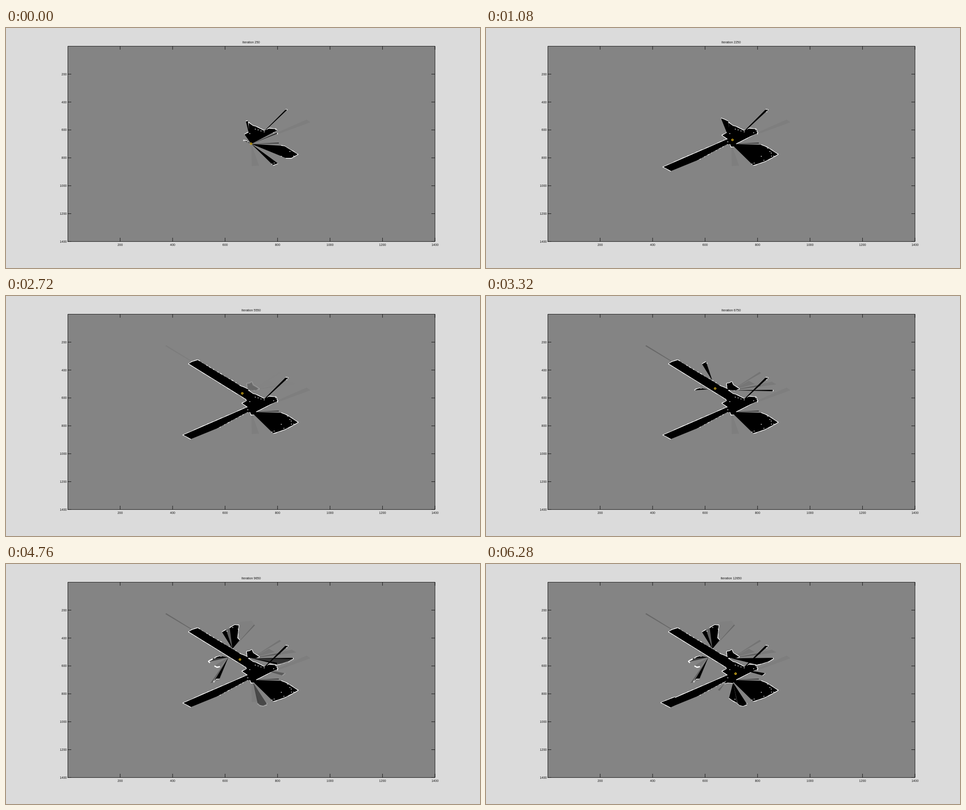
Recreate the animation shown at these times as an HTML page. Size 1053 px wide and 532 px high, loop 6.32 s.

```html
<!DOCTYPE html>
<html lang="en">
<head>
<meta charset="utf-8">
<title>Occupancy map</title>
<style>
  html, body { margin: 0; width: 100%; height: 100%; overflow: hidden; background: #dbdbdb; }
  svg { display: block; width: 100vw; height: 100vh; }
  text { font: 7px "Liberation Sans", Arial, sans-serif; fill: #111; }
  .middle { text-anchor: middle; }
  .end { text-anchor: end; }
  #walls { fill: none; stroke: #fff; stroke-width: 2.6; stroke-linejoin: round; }
  #walls .dotted { stroke-dasharray: 5 6 2 9 3 4; }
  #specks { fill: #fff; }
</style>
</head>
<body>
<svg viewBox="0 0 1053 532">
  <rect width="1053" height="532" fill="#dbdbdb"/>
  <rect x="137" y="40" width="816" height="433" fill="#848484"/>
  <g id="beams"></g>
  <g id="walls"></g>
  <g id="space"></g>
  <g id="specks"></g>
  <g id="axes"></g>
  <circle id="robot" r="1.9" fill="#2a2408" stroke="#f3c41c" stroke-width="1.4"/>
  <text id="title" class="middle" x="544.5" y="34"></text>
</svg>
<script>
const LOOP = 6320, STEP = 40, FADE = 350, FIRST = -FADE;
const $ = id => document.getElementById(id);
const clamp = v => Math.max(0, Math.min(1, v));
const mix = (a, b, k) => a.map((v, i) => v + (b[i] - v) * k);
const parse = s => s.trim().split(/\s+/).map(p => p.split(',').map(Number));

let seed = 7;
const random = () => (seed = seed * 16807 % 2147483647) / 2147483647;

function add(layer, tag, attrs, text = '') {
  const el = document.createElementNS('http://www.w3.org/2000/svg', tag);
  for (const k in attrs) el.setAttribute(k, attrs[k]);
  el.textContent = text;
  $(layer).append(el);
  return el;
}

// Every part of the map fades in once, from its start time.
const parts = [];
const reveal = (start, ...shape) => parts.push({ start, el: add(...shape) });

// Walks along a line in short steps: visit(a, b, k) for each.
function walk(points, size, visit) {
  for (let i = 1; i < points.length; i++) {
    const [a, b] = [points[i - 1], points[i]];
    const n = Math.ceil(Math.hypot(b[0] - a[0], b[1] - a[1]) / size);
    for (let k = 1; k <= n; k++) visit(mix(a, b, k / n));
  }
}

function wall(start, points, style = '') {
  const rough = [points[0]];
  walk(points, 4, p => rough.push(p.map(v => v + (random() - .5) * .9)));
  reveal(start, 'walls', 'polyline', { points: rough.join(' '), class: style });
}

// Open area; the outline after "|" is only partly seen.
function room(start, outline) {
  const [solid, rest] = outline.split('|').map(parse);
  const all = solid.concat(rest || []);
  reveal(start, 'space', 'polygon', { points: all.join(' ') });
  wall(start, rest ? solid : [...solid, solid[0]]);
  if (rest) wall(start, [solid.at(-1), ...rest], 'dotted');
}

// Grey, uncertain beam from an apex to a far edge.
const beam = (start, apex, far, fill) =>
  reveal(start, 'beams', 'polygon', { points: [apex, ...parse(far)].join(' '), fill });

// Cleared sector with a wall on its far edge and stray hits just inside it.
function fan(start, apex, far) {
  const edge = parse(far);
  reveal(start, 'space', 'polygon', { points: [apex, ...edge].join(' ') });
  wall(start, edge);
  walk(edge, 11, p => {
    const [x, y] = mix(p, apex, random() * .15);
    if (random() < .4) reveal(start, 'specks', 'rect', { x, y, width: 2.2, height: 1.4 });
  });
}

const home = [545, 257], nook = [545, 209], crown = [503, 188],
      west = [494, 207], south = [549, 263];

// First sweep
beam(FIRST, home, '546,306 562,305', '#7e7e7e');
beam(FIRST, home, '668,203 676,209', '#7e7e7e');
beam(FIRST, home, '606,254 606,256', '#333');
fan(FIRST, home, '530,236 540,231 539,210 549,217 554,218 574,228 584,223 599,224 602,227');
fan(FIRST, home, '533,207 537,206');
fan(FIRST, home, '621,181 625,181');
fan(FIRST, home, '603,232 602,234');
fan(FIRST, home, '527,249 535,251');
fan(FIRST, home, '611,261 619,262 632,270 648,280 634,288 621,288');
fan(FIRST, home, '604,300 593,304');

// Lower right area, then the crossing and the lower corridor
fan(160, home, '611,259 627,266 648,280 621,295 604,301 594,304');
fan(600, home, '522,200 530,203 538,207');
fan(600, home, '621,181 627,181');
room(700, '537,246 525,238 537,231 574,229 599,225 603,232 556,256 552,263 545,263');
room(700, '411,317 394,308 537,246 | 556,256 535,258 505,274 470,293');

// Upper corridor and its distant returns
room(1500, '537,231 406,150 413,146 426,142 | 460,163 503,188 549,218 574,229');
beam(2620, [500, 198], '354,111 356,109', '#686868');
beam(2700, nook, '608,168 611,171', '#747474');
beam(2700, nook, '584,188 597,195', '#767676');
beam(2700, nook, '635,190 645,196', '#7a7a7a');
beam(2700, nook, '610,197 610,200', '#5c5c5c');
room(2650, '536,204 535,194 541,193 546,190 549,197 563,206 | 553,209 538,208');
fan(2800, nook, '637,208 637,211');
fan(2850, crown, '480,151 489,146');
fan(2900, west, '463,209 469,206 476,204');

// Fans on both sides of the upper corridor
beam(3340, crown, '520,128 546,126 552,135', '#808080');
beam(3340, crown, '551,134 553,136', '#696969');
beam(3340, crown, '480,151 496,143 517,136', '#5c5c5c');
fan(3340, crown, '497,142 508,135 517,136 514,164 519,169');
beam(3360, west, '450,217 459,210 466,208', '#3c3c3c');
wall(3360, parse('453,219 450,216 459,210'));
beam(3400, west, '462,226 476,228', '#757575');
wall(3400, parse('463,226 469,229 475,227'));
beam(3420, west, '454,264 461,262 476,253', '#626262');
fan(3600, nook, '603,219 602,222');
fan(4000, west, '461,262 467,255 474,254');

// Way back
fan(4540, nook, '639,209 628,216 612,221 602,223');
fan(4600, south, '559,309 563,313 571,315 580,311');
fan(4650, [560, 232], '620,242 614,247');
room(5100, '530,265 537,263 548,264 | 556,256 535,257');
fan(5620, south, '540,297 547,302 558,308');
beam(5800, [530, 265], '515,279 519,281', '#666');
room(5820, '410,318 389,307 420,295 | 420,313');

// Axes: one tick every 200 units
let lines = 'M137.4 40.4H953V473.4H137.4Z';
for (let v = 200; v <= 1400; v += 200) {
  const x = 137 + v * 816 / 1400, y = 40.4 + v * 433 / 1400;
  lines += `M${x} 40v8M${x} 473v-8M137 ${y}h8M953 ${y}h-8`;
  add('axes', 'text', { x, y: 483, class: 'middle' }, v);
  add('axes', 'text', { x: 135, y: y + 2.5, class: 'end' }, v);
}
add('axes', 'path', { d: lines, fill: 'none', stroke: '#111' });

// Stops of the robot: time, x, y
const route = [[0, 544.5, 256.5], [1080, 547.5, 248], [2040, 543, 228], [3320, 509, 205],
               [4040, 496.5, 198], [5480, 543, 225.5], [LOOP, 555, 244]];

function position(t) {
  const i = route.findIndex(stop => stop[0] > t), a = route[i - 1], b = route[i];
  return mix(a, b, (t - a[0]) / (b[0] - a[0])).slice(1);
}

function draw(now) {
  const n = Math.floor(now % LOOP / STEP), t = n * STEP;
  for (const { el, start } of parts) el.style.opacity = clamp((t - start) / FADE);
  $('robot').setAttribute('transform', `translate(${position(t)})`);
  $('title').textContent = 'Iteration ' + Math.max(250, Math.ceil((80 * n + 90) / 50) * 50);
}

let origin;
function tick(now) {
  origin ??= now;
  draw(now - origin);
  requestAnimationFrame(tick);
}
draw(0);
requestAnimationFrame(tick);
</script>
</body>
</html>
```
